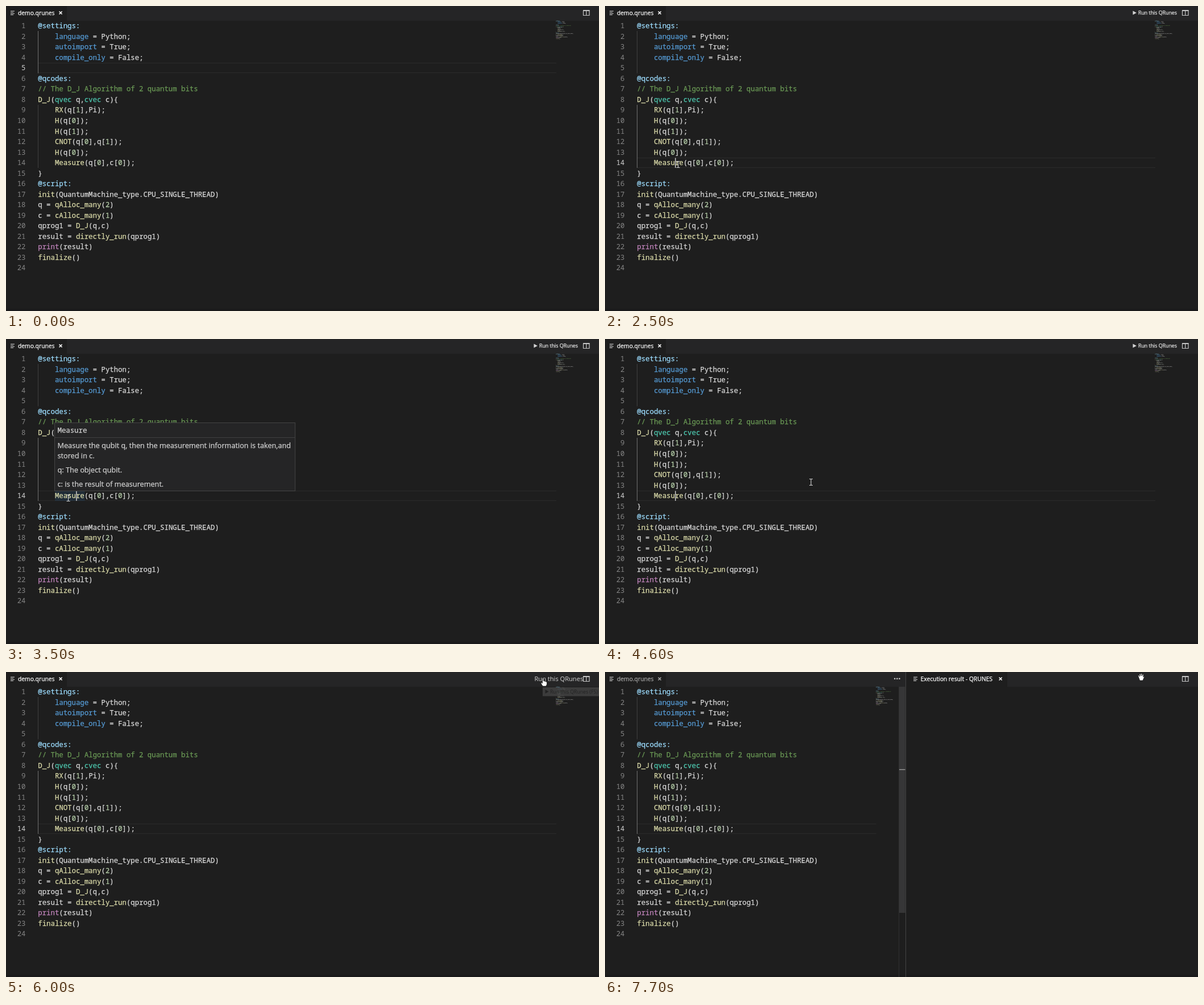
An HTML page for the animation above (8 s loop, 1042x537 px).

```html
<!DOCTYPE html>
<html lang="en">
<head>
<meta charset="utf-8">
<title>Editor demo</title>
<style>
  html, body { margin: 0; width: 100%; height: 100%; overflow: hidden; background: #1e1e1e; }
  svg { display: block; width: 1042px; height: 537px; }
  text { white-space: pre; stroke-width: .25px; }
  .mono { font-family: "Noto Sans Mono", "DejaVu Sans Mono", monospace; font-size: 12.34px; fill: #d4d4d4; }
  .ui { font-family: "Open Sans", "Noto Sans", sans-serif; font-size: 10.3px; fill: #fff; stroke: #fff; }
  .doc { font-size: 12.7px; fill: #d4d4d4; stroke: #d4d4d4; }
  .label { font-size: 8.8px; fill: #e4e4e4; stroke: #e4e4e4; }
  .large { font-size: 11.1px; fill: #d4d4d4; stroke: none; }
  .tip { font-size: 8.7px; fill: #222; stroke: none; }
</style>
</head>
<body>
<svg viewBox="0 0 1042 537">
  <defs>
    <g id="fileIcon" stroke="#d4d4d4" stroke-width="1.1">
      <path d="M0 .5H7M0 3H5M0 5.5H7M0 8H5" transform="scale(1 .88)"/>
    </g>
    <path id="close" d="M-2.5 -2.5L2.5 2.5M2.5 -2.5L-2.5 2.5" stroke-width="1.6"/>
  </defs>
  <rect width="1042" height="537" fill="#1e1e1e"/>
  <rect y="533" width="1042" height="4" fill="#1a1a1b"/>
  <rect width="1042" height="26" fill="#252526"/>
  <rect width="107" height="26" fill="#1e1e1e"/>
  <use href="#fileIcon" x="8" y="8.5"/>
  <g id="leftTitle">
    <text class="ui" x="21" y="16">demo.qrunes</text>
    <use href="#close" x="96" y="12" stroke="#fff"/>
  </g>

  <path id="lineBox" fill="none" stroke="#2b2b2b"/>
  <rect id="wordBox" x="86" y="267" width="52.5" height="18" fill="#264f78"/>
  <path id="guideTop" d="M56.5 44V118.5"/>
  <path id="guideBody" d="M56.5 174V285"/>
  <g id="numbers" class="mono" text-anchor="end"></g>
  <g id="code" class="mono" transform="translate(56.3 26)"></g>
  <use id="minimap" href="#codeLines"/>
  <rect id="caret" x="123" y="267.5" width="1.5" height="17.5" fill="#c8c8c8"/>

  <g id="popup">
    <rect x="85.5" y="147.5" width="422.5" height="120" fill="#252526" stroke="#454545"/>
    <path d="M86 173.5H508" stroke="#404041"/>
    <text class="mono" x="90.5" y="165" stroke="#d4d4d4">Measure</text>
    <text class="ui doc" x="90.5" y="192">Measure the qubit q, then the measurement information is taken,and</text>
    <text class="ui doc" x="90.5" y="210">stored in c.</text>
    <text class="ui doc" x="90.5" y="234.5">q: The object qubit.</text>
    <text class="ui doc" x="90.5" y="260">c: is the result of measurement.</text>
  </g>

  <g id="split">
    <path d="M528.5 0V537" stroke="#444"/>
    <path d="M516.5 26V537" stroke="#303031"/>
    <rect id="slider" x="517" y="26" width="10.5" height="398"/>
    <rect x="517" y="171" width="10.5" height="1.5" fill="#929292"/>
    <g fill="#d0d0d0">
      <circle cx="509.2" cy="11.7" r="1.3"/><circle cx="513.3" cy="11.7" r="1.3"/><circle cx="517.4" cy="11.7" r="1.3"/>
    </g>
    <rect x="529" width="178" height="26" fill="#1e1e1e"/>
    <use href="#fileIcon" x="542" y="8.5"/>
    <text class="ui" x="554.5" y="16">Execution result - QRUNES</text>
    <use href="#close" x="695" y="12" stroke="#fff"/>
  </g>

  <g id="runSmall">
    <path d="M927.5 8.5L934 12L927.5 15.5Z" fill="#d4d4d4"/>
    <text class="ui label" x="937" y="15.3">Run this QRunes</text>
  </g>
  <text id="runLarge" class="ui large" x="928.5" y="15.5">Run this QRunes</text>
  <path d="M1014.5 8V16.5H1025V8M1019.75 8V16.5" fill="none" stroke="#c5c5c5" stroke-width="1.2"/>
  <path d="M1014 8H1025.6" stroke="#c5c5c5" stroke-width="2"/>
  <g id="tip">
    <rect x="943" y="27" width="99" height="15.5" fill="#444" opacity=".8"/>
    <path d="M947.5 31L953.5 34.5L947.5 38Z" fill="#222"/>
    <text class="ui tip" x="956" y="38">Run this QRunes (F5)</text>
  </g>

  <path id="beam" d="M-3 -5.5H-1L0 -5L1 -5.5H3M0 -5V5M-3 5.5H-1L0 5L1 5.5H3" fill="none" stroke="#d8d8d8" stroke-width="1.1"/>
  <g fill="#fff" stroke="#111" stroke-width=".7" stroke-linejoin="round">
    <path id="hand" d="M-2.5 -6.5Q-1.3 -8 -.3 -6.5V-2Q1 -2.8 1.8 -1.6Q3 -2.2 3.7 -1Q5.2 -1.4 5.5 .4V3.5L4 7H-1.8L-5 2Q-5.3 .2 -3.8 .6L-2.5 2Z"/>
    <path id="grab" d="M-5.3 -2.5Q-4.3 -4 -3.2 -2.5L-2.5 -1L-3 -4.8Q-1.7 -6.5 -1 -4.8L-.5 -2V-5.5Q.8 -7 1.6 -5.5V-2L2.3 -4.5Q3.7 -5.8 4.2 -4.2L3.8 0Q5 -2 5.8 -.6L4 3.5L3 6H-2.3Z"/>
  </g>
</svg>
<script>
const $ = id => document.getElementById(id);
const SVG = "http://www.w3.org/2000/svg";
const LINE = 18.52, BASE = 13.3;
const source = `@settings:
    language = Python;
    autoimport = True;
    compile_only = False;

@qcodes:
// The D_J Algorithm of 2 quantum bits
D_J(qvec q,cvec c){
    RX(q[1],Pi);
    H(q[0]);
    H(q[1]);
    CNOT(q[0],q[1]);
    H(q[0]);
    Measure(q[0],c[0]);
}
@script:
init(QuantumMachine_type.CPU_SINGLE_THREAD)
q = qAlloc_many(2)
c = cAlloc_many(1)
qprog1 = D_J(q,c)
result = directly_run(qprog1)
print(result)
finalize()
`.split("\n");

const rules = [
  [/^\/\/.*/, "#6a9955"],
  [/^@\w+:/, "#9cdcfe"],
  [/^(language|autoimport|compile_only)\b/, "#569cd6"],
  [/^[qc]vec\b/, "#4ec9b0"],
  [/^print\b/, "#c586c0"],
  [/^\w+(?=\()/, "#dcdcaa"],
  [/^\d+/, "#b5cea8"],
  [/^([A-Za-z_]\w*|\s+|.)/, "#dadada"]
];

function add(parent, tag, attrs, content = "") {
  const node = document.createElementNS(SVG, tag);
  for (const key in attrs) node.setAttribute(key, attrs[key]);
  node.textContent = content;
  return parent.appendChild(node);
}

const codeLines = add($("code"), "g", { id: "codeLines", class: "mono" });
const numbers = source.map((line, i) => {
  const y = i * LINE + BASE;
  const row = add(codeLines, "text", { x: 0, y });
  while (line) {
    const [pattern, color] = rules.find(([p]) => p.test(line));
    const token = line.match(pattern)[0];
    add(row, "tspan", { fill: color, stroke: color }, token);
    line = line.slice(token.length);
  }
  return add($("numbers"), "text", { x: 34.5, y: y + 26 }, i + 1);
});

// Pointer stops: time, x, y
const path = [
  [400, 976, 50], [800, 620, 148], [1200, 280.5, 134], [1600, 188.5, 211],
  [2100, 134, 283], [2300, 128.5, 279], [2600, 128.5, 279], [3100, 109.5, 280],
  [4300, 109.5, 280], [4600, 362, 252], [5200, 926, 28], [5600, 945, 18],
  [6800, 945, 18], [6900, 942, 9], [8000, 942, 9]
];
const caretToggles = [2500, 3000, 3400, 3800, 4200, 4700, 5100, 5600, 6100, 6500];

function pointerAt(t) {
  const i = Math.max(1, path.findIndex(stop => stop[0] >= t));
  const [t0, x0, y0] = path[i - 1], [t1, x1, y1] = path[i];
  const k = Math.max(0, (t - t0) / (t1 - t0));
  return [x0 + (x1 - x0) * k, y0 + (y1 - y0) * k];
}

const show = (id, on) => $(id).setAttribute("opacity", +on);
const set = (id, key, value) => $(id).setAttribute(key, value);

function render(t) {
  const focused = t >= 2500, split = t >= 6900;
  const active = focused ? 14 : 5;
  const top = Math.round(26 + (active - 1) * LINE) + .5;
  const right = split ? 476.5 : 967;
  set("lineBox", "d", `M57 ${top}H${right}M57 ${top + 17}H${right}`);
  set("guideTop", "stroke", focused ? "#404040" : "#707070");
  set("guideBody", "stroke", focused ? "#707070" : "#404040");
  set("minimap", "transform", `translate(${right - .5} 26) scale(.095 .075)`);
  numbers.forEach((n, i) => n.style.fill = i + 1 === active ? "#d0d0d0" : "#858585");

  show("caret", caretToggles.filter(time => time <= t).length % 2);
  const hovering = t >= 3300 && t < 4400;
  show("popup", hovering ? Math.min(1, (t - 3200) / 300) : 0);
  show("wordBox", hovering ? .28 : 0);

  const pressed = t >= 5800 && t < 6100;
  show("runSmall", focused && !split && !pressed);
  show("runLarge", pressed);
  show("tip", pressed && t >= 5900);
  show("split", split);
  show("leftTitle", split ? .6 : 1);
  set("slider", "fill", t < 7700 ? "#424242" : "#363637");

  const [x, y] = pointerAt(t);
  const shape = split ? "grab" : t >= 5300 ? "hand" : "beam";
  for (const id of ["beam", "hand", "grab"]) {
    show(id, id === shape && t >= 400);
    set(id, "transform", `translate(${x} ${y})`);
  }
}

const start = performance.now();
function tick() {
  const t = (performance.now() - start) % 8000;
  render(Math.floor(t / 100) * 100);
  requestAnimationFrame(tick);
}
tick();
</script>
</body>
</html>
```
